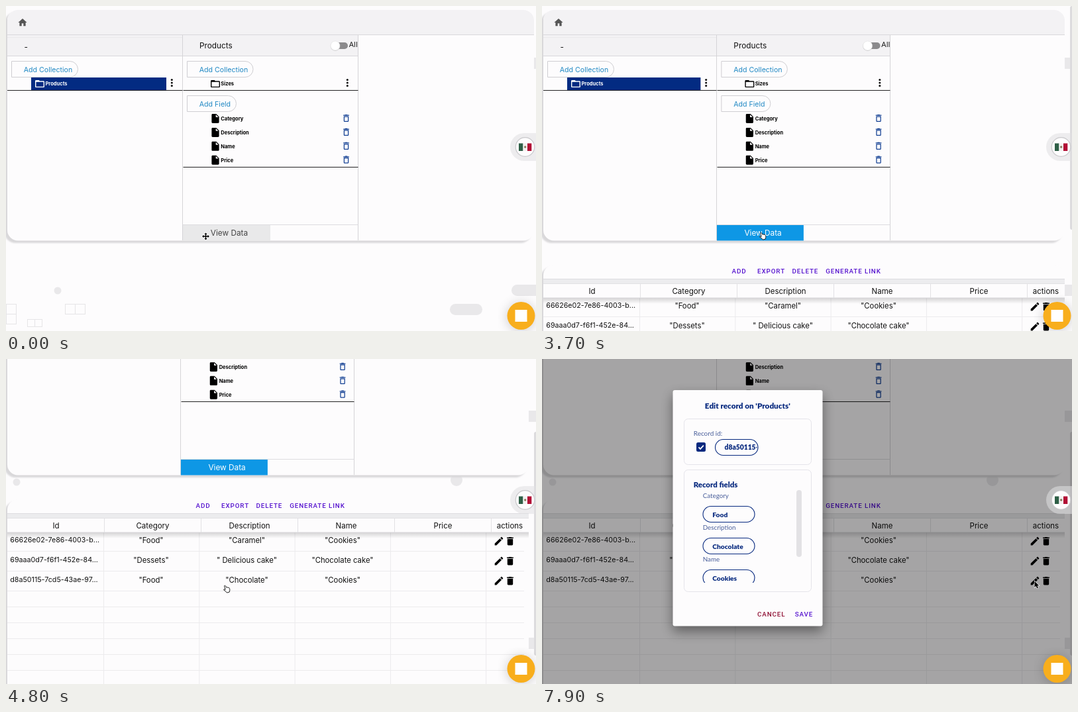
Recreate the animation shown at these times as an HTML page. Size 800 by 491 pixels, loop 8 s.

```html
<!DOCTYPE html>
<html lang="en">
<head>
<meta charset="utf-8">
<title>Collection editor</title>
<style>
html, body { margin: 0; width: 100%; height: 100%; overflow: hidden; background: #fdfcfd; }
svg { display: block; width: 800px; height: 491px; }
text { font-family: Montserrat, Inter, sans-serif; white-space: pre; }
.rob { font-family: Roboto, sans-serif; font-weight: 500; }
.lato { font-family: Lato, sans-serif; }
.noto { font-family: "Noto Sans", sans-serif; font-weight: 500; }
.b { font-weight: 700; }
.h { font-weight: 900; }
</style>
</head>
<body>
<svg id="stage" viewBox="0 0 800 491" xmlns="http://www.w3.org/2000/svg"></svg>
<script>
const LOOP = 8000, SCROLL = 179, PAPER = '#fdfcfd', NAVY = '#07297f', PURPLE = '#5512cf';

const ICON = {
  home: 'M10 20v-6h4v6h5v-8h3L12 3 2 12h3v8z',
  folder: 'M20 6h-8l-2-2H4c-1.1 0-2 .9-2 2v12c0 1.1.9 2 2 2h16c1.1 0 2-.9 2-2V8c0-1.1-.9-2-2-2zm0 12H4V8h16z',
  file: 'M6 2c-1.1 0-2 .9-2 2v16c0 1.1.9 2 2 2h12c1.1 0 2-.9 2-2V8l-6-6zm7 7V3.500L18.500 9z',
  bin: 'M6 19c0 1.1.9 2 2 2h8c1.1 0 2-.9 2-2V7H6zM19 4h-3.500l-1-1h-5l-1 1H5v2h14z',
  binLine: 'M6 19c0 1.1.9 2 2 2h8c1.1 0 2-.9 2-2V7H6zM8 9h8v10H8zm7.500-5l-1-1h-5l-1 1H5v2h14V4z',
  pen: 'M3 17.250V21h3.750L17.800 9.940l-3.750-3.750zM20.700 7.040a1 1 0 0 0 0-1.410l-2.340-2.340a1 1 0 0 0-1.410 0l-1.830 1.830 3.750 3.750z'
};

const rect = (x, y, w, h, fill, more = '') =>
  `<rect x="${x}" y="${y}" width="${w}" height="${h}" fill="${fill}" ${more}/>`;
const circle = (x, y, r, fill, more = '') =>
  `<circle cx="${x}" cy="${y}" r="${r}" fill="${fill}" ${more}/>`;
const line = (x1, y1, x2, y2, color) =>
  `<path d="M${x1} ${y1}L${x2} ${y2}" stroke="${color}" fill="none"/>`;
// cy is the middle of the capitals
const text = (s, x, cy, size, fill, more = '') =>
  `<text x="${x}" y="${cy + size * 0.36}" font-size="${size}" fill="${fill}" ${more}>${s}</text>`;
const MID = 'text-anchor="middle"';
const icon = (name, cx, cy, k, fill) =>
  `<path transform="translate(${cx - 12 * k} ${cy - 12 * k}) scale(${k})" d="${ICON[name]}" fill="${fill}" fill-rule="evenodd"/>`;
const dots = (x, y) => [-4.5, 0, 4.5].map(d => circle(x, y + d, 1.55, '#111')).join('');
const caps = (s, x, y, fill) => text(s, x, y, 9.8, fill, 'class="rob" letter-spacing=".9"');

function chip(label, x, y, w) {
  const d = `M${x} ${y}h${w - 12}a12 12 0 0 1 0 24h-${w - 12}z`;
  return `<path d="${d}" fill="${PAPER}" stroke="#cfced2"/>` + text(label, x + 18.3, y + 13, 10.6, '#2189c4');
}

function backdrop() {
  const box = (x, y, s) => rect(x, y, s, s, 'none', 'stroke="#e6e5e7"');
  return rect(0, 0, 800, 491, PAPER)
    + rect(770, 78, 50, 17, '#e9e8ea') + rect(763, 421, 60, 17, '#e9e8ea', 'rx="8.5"')
    + rect(670, 450, 49, 17, '#e9e8ea', 'rx="8.5"')
    + circle(78, 430, 5.5, '#e9e8ea') + circle(725, 290, 5.5, '#e9e8ea')
    + circle(16, 186, 5.5, '#e9e8ea') + circle(680, 183, 9, '#e9e8ea')
    + box(.5, 450.5, 15) + box(.5, 465.5, 15) + box(89.5, 450.5, 15) + box(104.5, 450.5, 15)
    + box(32.5, 473.5, 11) + box(43.5, 473.5, 11);
}

function panel(y, h, right) {
  return rect(-2, y + 3.5, right - 2, h, '#d9d8da', 'rx="16" filter="url(#soft)"')
    + rect(2, y, right - 2, h, PAPER, 'rx="16"');
}

// shrink: how much narrower the page gets once a scrollbar is there
function editor(shrink) {
  const right = 797 - shrink, a = 267 - shrink * .35, b = 532 - shrink * .7;
  const m = x => x - shrink * .33, e = x => x - shrink * .68;
  const c1 = Math.round(a) - .5, c2 = Math.round(b) - .5;
  let s = panel(6, 348.5, right);
  s += `<path d="M2 43V22a16 16 0 0 1 16-16H${right - 16}a16 16 0 0 1 16 16V43z" fill="#f3f2f4"/>`;
  s += rect(2, 44, c1 - 2, 32, '#f3f2f4') + rect(c1, 44, c2 - c1, 31, '#f3f2f4');
  s += line(2, 43.5, right, 43.5, '#d9d8db') + line(2, 75.5, c2, 75.5, '#d9d8db');
  s += line(2, 47.5, c1, 47.5, '#eae9eb');
  s += line(c1, 44, c1, 354, '#d5d4d7') + line(c2, 44, c2, 354, '#d5d4d7');
  s += icon('home', 25, 25, .66, '#555');
  s += text('-', 27.5, 62, 11.8, '#111') + text('Products', m(292), 60, 11.8, '#111');
  s += rect(e(496), 55, 20, 10, '#8b8a8c', 'rx="5"');
  s += circle(e(497), 60.7, 7.2, '#bbb', 'opacity=".6"') + circle(e(497), 60, 7, '#fff', 'stroke="#ddd" stroke-width=".5"');
  s += text('All', e(517.8), 58, 11.4, '#222', 'class="noto"');

  s += chip('Add Collection', 8.5, 83.5, 100) + chip('Add Collection', m(273.5), 83.5, 99.5);
  s += chip('Add Field', m(273.5), 135.5, 74);
  s += rect(38, 108, m(242) - 38, 19, '#032b82');
  s += icon('folder', 51, 117.5, .7, '#fff') + text('Products', 59.5, 117.5, 7.5, '#fff', 'class="b"');
  s += icon('folder', m(316), 117.5, .7, '#000') + text('Sizes', m(324.3), 117.5, 7.5, '#000', 'class="b"');
  s += dots(m(250.3), 116) + dots(e(515.3), 116);
  s += line(2, 127.5, c1, 127.5, '#222') + line(c1 + 1, 127.5, c2, 127.5, '#222');
  ['Category', 'Description', 'Name', 'Price'].forEach((name, i) => {
    const y = 170 + i * 20.9;
    s += icon('file', m(316), y, .7, '#000') + text(name, m(324.3), y + .3, 7.5, '#000', 'class="b"');
    s += icon('binLine', e(513.5), y - .5, .62, '#123f93');
  });
  s += line(c1 + 1, 243.5, c2, 243.5, '#222');
  s += line(c1, 330.5, c2, 330.5, '#dddce0');
  s += rect(c1 + .5, 331, 132 - shrink * .14, 23.5, '#e9e9ea', 'class="btn"');
  s += text('View Data', m(337) - shrink * .1, 343, 11.8, '#444', 'class="btnText" ' + MID);
  return s;
}

function table() {
  const right = 789, headX = i => 148.5 + i * 146, cellX = i => 147.5 + i * 144.3;
  const pale = '#ecebed';
  let s = panel(391, 420, right);
  s += caps('ADD', 286.6, 400, PURPLE) + caps('EXPORT', 325, 400, PURPLE)
    + caps('DELETE', 377.5, 400, PURPLE) + caps('GENERATE LINK', 428.2, 400, PURPLE);
  for (let i = 0; i < 5; i++) s += line(cellX(i), 441, cellX(i), 760, pale);
  for (let i = 0; i < 13; i++) {
    const y = i < 3 ? 469.5 + i * 30 : 529.5 + (i - 2) * 24;
    s += line(2, y, 782, y, pale);
  }
  s += rect(2, 412, right - 2, 7, '#ececee') + line(2, 412.5, right, 412.5, '#dddce0');
  s += rect(2, 441, right - 2, 9, 'url(#fade)');
  s += rect(2, 419, right - 2, 22, PAPER) + line(2, 419.5, right, 419.5, '#e2e1e4');
  s += line(2, 441, right, 441, '#d9d8db');
  ['Id', 'Category', 'Description', 'Name', 'Price'].forEach((name, i) => {
    s += text(name, 75.5 + i * 146, 431, 11.5, '#111', MID);
    s += line(headX(i), 420, headX(i), 441, '#e2e1e4');
  });
  s += text('actions', 760.5, 431, 11.5, '#111', MID);
  [
    ['66626e02-7e86-4003-b...', 'Food', 'Caramel', 'Cookies'],
    ['69aaa0d7-f6f1-452e-84...', 'Dessets', ' Delicious cake', 'Chocolate cake'],
    ['d8a50115-7cd5-43ae-97...', 'Food', 'Chocolate', 'Cookies']
  ].forEach((row, r) => {
    const y = 452.5 + r * 30;
    row.forEach((v, i) => {
      s += i ? text(`"${v}"`, 219 + (i - 1) * 144.5, y, 11.3, '#111', MID) : text(v, 6.3, y, 10.7, '#111');
    });
    s += icon('pen', 744, y + 1.7, .7, '#000') + icon('bin', 761, y + 1.7, .7, '#000');
  });
  return s;
}

function dialog() {
  const edge = `stroke="${NAVY}" stroke-width="1.1"`, card = 'rx="6" stroke="#e5e4ea"';
  let s = rect(197.5, 47, 226, 356.5, '#000', 'rx="4" opacity=".42" filter="url(#deep)" transform="translate(0 8)"');
  s += rect(197.5, 47, 226, 356.5, PAPER, 'rx="3"');
  s += text("Edit record on 'Products'", 310.3, 71, 11.7, NAVY, 'class="lato h" ' + MID);
  s += rect(214.5, 90.5, 192, 69, PAPER, card) + rect(214.5, 167.5, 192, 184, PAPER, card);
  s += text('Record id:', 228.7, 112, 10, '#4a5f9b', 'class="lato"');
  s += rect(233, 126, 14, 14, NAVY, 'rx="2.5"');
  s += '<path d="M236.500 133.300l2.500 2.600 4.800-5.300" fill="none" stroke="#fff" stroke-width="1.8"/>';
  s += rect(261.5, 121.5, 64.5, 24, PAPER, 'rx="12" ' + edge);
  s += `<g clip-path="url(#idClip)">${text('d8a50115-7cd5', 275.5, 133.5, 10.3, NAVY, 'class="lato h"')}</g>`;
  s += text('Record fields', 228.7, 189.5, 11.4, NAVY, 'class="lato h"');
  s += '<g clip-path="url(#listClip)">';
  [['Category', 'Food'], ['Description', 'Chocolate'], ['Name', 'Cookies']].forEach(([label, value], i) => {
    const y = 206 + i * 48;
    s += text(label, 242.7, y + .5, 9.8, '#4a5f9b', 'class="lato"');
    s += rect(243, y + 16.5, 78, 24, PAPER, 'rx="12" ' + edge);
    s += text(value, 257.3, y + 29, 10.2, NAVY, 'class="lato h"');
  });
  s += '</g>' + rect(384, 198, 8, 101, '#e3e2e5', 'rx="4"');
  return s + caps('CANCEL', 325, 385.5, '#8f0f33') + caps('SAVE', 381.7, 385.5, PURPLE);
}

function flag() {
  return '<path d="M800 192h-18a21 21 0 0 0 0 42h18z" fill="#e1e0e2" opacity=".55"/>'
    + circle(783.5, 213, 14.3, PAPER, 'stroke="#c9c8cb" stroke-width="1.2"')
    + rect(774, 207.5, 6.5, 11.5, '#2e5f47') + rect(780.5, 207.5, 6.5, 11.5, '#f4f2f2')
    + rect(787, 207.5, 6.3, 11.5, '#b20f35') + circle(783.7, 213, 1.7, '#8a7c5c');
}

function helpButton() {
  return circle(777.5, 470, 21, '#000', 'opacity=".2" filter="url(#deep)"')
    + circle(777.5, 468, 21, '#f8ae1c') + rect(768.5, 459, 18, 18, '#fff');
}

const CURSOR = {
  move: '<path d="M0-5.500L2.200-3H.8V-.8H3V-2.200L5.500 0 3 2.200V.8H.8V3H2.200L0 5.500-2.200 3H-.8V.8H-3V2.200L-5.500 0-3-2.200V-.8H-.8V-3H-2.200z" fill="#000" stroke="#fff" stroke-width="1.600" paint-order="stroke"/>',
  hand: '<path d="M-2.500-4.800q1.300-1.200 2.100.3l1.200 2.300 1.200-.5 1.200.6 1.100-.2.800.9q1 1.700.7 3.300l-.6 2.700-3.900 1-1.200-1.700-3.400-2.500q-.3-1.500 1.600-.9l.9.400z" fill="#fff" stroke="#222" stroke-width="1"/>',
  arrow: '<path d="M0 0V9.600L2.200 7.600 3.700 11 5.400 10.300 3.900 7H6.800z" fill="#000" stroke="#fff" stroke-width="1.200" paint-order="stroke"/>'
};

const stage = document.getElementById('stage');
stage.innerHTML = `<defs>
  <filter id="soft" x="-5%" y="-5%" width="110%" height="110%"><feGaussianBlur stdDeviation=".8"/></filter>
  <filter id="deep" x="-30%" y="-30%" width="160%" height="160%"><feGaussianBlur stdDeviation="9"/></filter>
  <linearGradient id="fade" x2="0" y2="1"><stop stop-opacity=".16"/><stop offset="1" stop-opacity="0"/></linearGradient>
  <clipPath id="idClip"><rect x="262" y="121" width="62.500" height="25"/></clipPath>
  <clipPath id="listClip"><rect x="216" y="198" width="166" height="140"/></clipPath>
</defs>
${backdrop()}
<g id="wide">${editor(0)}</g>
<g id="narrow"><rect id="thumb" x="797" width="6" height="338" rx="3" fill="#dcdbdd"/><g id="page">${editor(8)}${table()}</g></g>
<rect id="scrim" width="800" height="491"/>
<g id="dialog">${dialog()}</g>
${flag()}${helpButton()}
<circle id="ring" r="22" fill="#f9c04a"/>
${Object.keys(CURSOR).map(k => `<g id="${k}">${CURSOR[k]}</g>`).join('')}`;

const el = id => document.getElementById(id);
const set = (id, name, v) => el(id).setAttribute(name, v);
const show = (id, on) => set(id, 'display', on ? 'inline' : 'none');
const part = (t, from, to) => Math.min(1, Math.max(0, (t - from) / (to - from)));
const ease = p => p * p * (3 - 2 * p);
const buttons = [...document.querySelectorAll('.btn')], labels = [...document.querySelectorAll('.btnText')];

// stops: [start, end, x, y]
const PATH = [[1000, 1600, 332, 347.5], [5200, 6000, 641, 333], [6300, 6700, 743.5, 335.5]];

function pointer(t) {
  let x = 301.5, y = 348;
  for (const [from, to, px, py] of PATH) {
    const p = ease(part(t, from, to));
    x += (px - x) * p;
    y += (py - y) * p;
  }
  return [x, y];
}

function mix(a, b, p) {
  return `rgb(${a.map((v, i) => Math.round(v + (b[i] - v) * p))})`;
}

function draw(t) {
  const loaded = t >= 3700;
  show('wide', !loaded);
  show('narrow', loaded);
  const scroll = SCROLL * ease(part(t, 3700, 4580));
  set('page', 'transform', `translate(0 ${-scroll.toFixed(1)})`);
  set('thumb', 'y', scroll * .615);

  const hover = part(t, 1890, 2050) * (1 - part(t, 4880, 5000));
  buttons.forEach(n => n.setAttribute('fill', mix([233, 233, 234], [14, 151, 229], hover)));
  labels.forEach(n => n.setAttribute('fill', mix([68, 68, 68], [255, 255, 255], hover)));

  const open = part(t, 7581, 7731), k = .8 + .2 * (1 - (1 - open) ** 3);
  set('scrim', 'opacity', .35 * open);
  show('dialog', open > 0);
  set('dialog', 'opacity', part(t, 7581, 7656));
  set('dialog', 'transform', `translate(310.5 225.2) scale(${k}) translate(-310.5 -225.2)`);

  const [x, y] = pointer(t);
  const kind = t < 1890 ? 'move' : t < 4900 ? 'hand' : 'arrow';
  for (const name in CURSOR) {
    show(name, name === kind);
    set(name, 'transform', `translate(${x} ${y})`);
  }
  const first = part(t, 2250, 2350) * (1 - part(t, 2500, 2700));
  const second = part(t, 7300, 7420) * (1 - part(t, 7620, 7780));
  set('ring', 'opacity', .45 * (first + second));
  set('ring', 'cx', x);
  set('ring', 'cy', y);
}

const start = performance.now();
function tick() {
  draw((performance.now() - start) % LOOP);
  requestAnimationFrame(tick);
}
draw(0);
requestAnimationFrame(tick);
</script>
</body>
</html>
```
